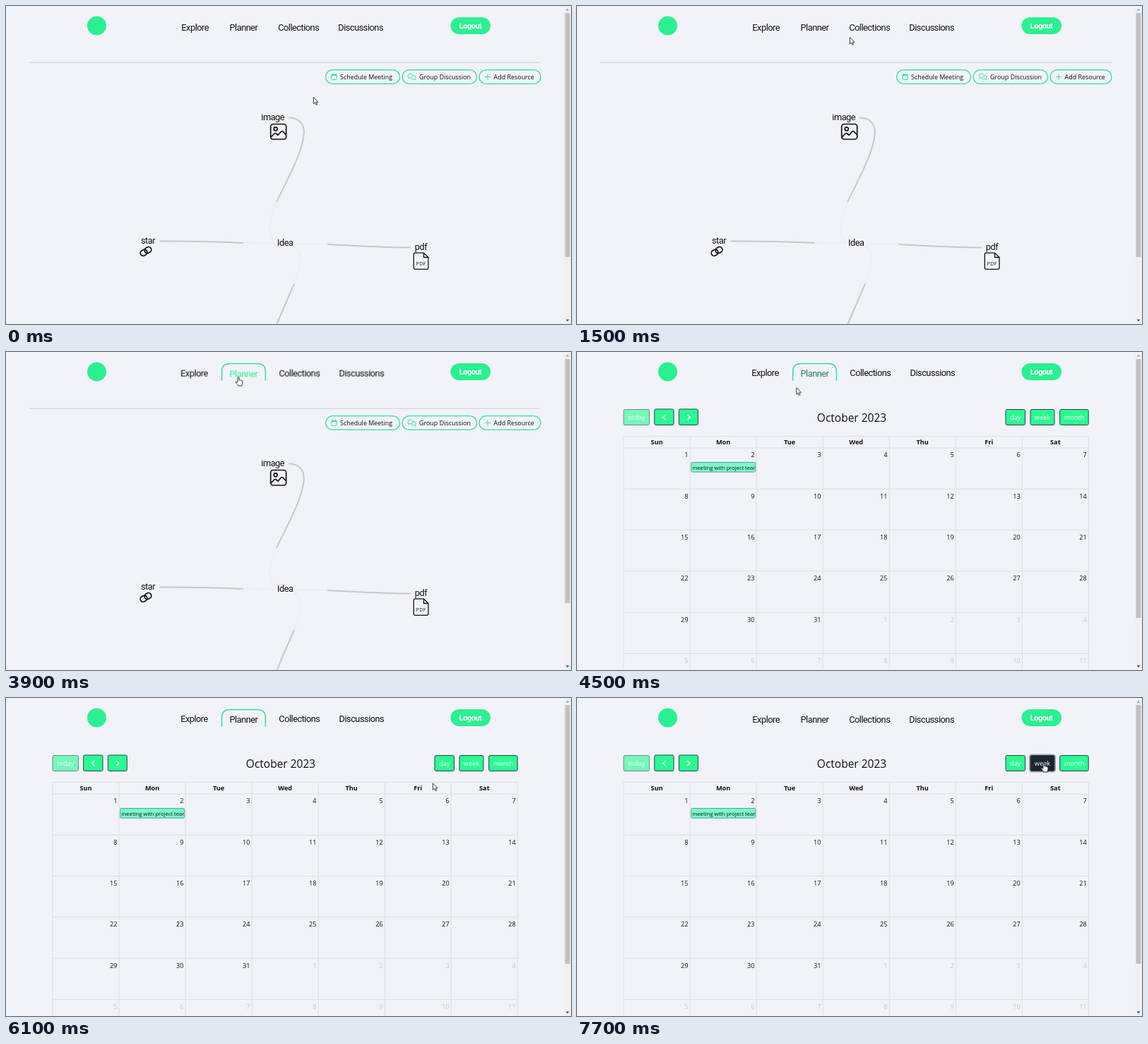
Animation of 800x451 px, one loop 8 s. Source, as an HTML page:

```html
<!DOCTYPE html>
<html lang="en">
<head>
<meta charset="utf-8">
<title>Planner</title>
<style>
html, body { margin: 0; width: 100%; height: 100%; overflow: hidden; background: #f2f3f9; }
svg { display: block; width: 100vw; height: 100vh; }
text { font-family: "Open Sans", "Noto Sans", sans-serif; fill: #111; }
.narrow { font: 12.8px Roboto, sans-serif; letter-spacing: -.5px; text-anchor: middle; }
.logout { font-size: 11px; font-weight: 700; fill: #fff; }
.pill text { font-size: 8.95px; font-weight: 500; }
.pill rect, .icon { fill: none; stroke: #2be592; stroke-width: 1.3; }
.icon { stroke-width: 1; stroke-linejoin: round; }
.ink { fill: none; stroke: #111; stroke-width: 1.7; stroke-linejoin: round; stroke-linecap: round; }
.link { fill: none; stroke: #c8c8ca; stroke-width: 2; }
.faint { stroke: #edeef2; }
.grid { fill: none; stroke: #dddee3; stroke-width: 1; }
.head { font-size: 9.2px; font-weight: 700; text-anchor: middle; }
.date { font-size: 9.2px; text-anchor: end; }
.other { fill: #c3c5ca; }
.btn rect { fill: #2bfa93; stroke: #2c3e50; stroke-width: 1; }
.btn text { font-size: 9.2px; text-anchor: middle; fill: #fff; }
.btn path { fill: none; stroke: #fff; stroke-width: 1.5; }
.off { opacity: .62; }
.pointer { fill: #fff; stroke: #222; stroke-width: .9; stroke-linejoin: round; }

/* One 8 s loop; motion advances every 100 ms */
.board, .calendar, .tab, .arrow, .hand, .week rect, .ring, .nav { animation: 8s step-end infinite; }
.board { animation-name: leave; }
.calendar { animation-name: enter; }
.tab { animation-name: focus; }
.nav { animation-name: nudge; }
.planner { animation: nudge 8s step-end infinite, hover 8s linear infinite; }
.hand { animation-name: point; }
.arrow { animation-name: unpoint; }
.week rect { animation-name: darken; }
.week .ring { fill: none; stroke: #a4a9b3; stroke-width: 2; animation-name: press; }
.cursor { animation: move 8s linear infinite; }

@keyframes leave { 0% { visibility: visible } 52.5%, 100% { visibility: hidden } }
@keyframes enter { 0% { visibility: hidden } 52.5%, 100% { visibility: visible } }
@keyframes focus { 0% { opacity: 0 } 33.75% { opacity: 1 } 95%, 100% { opacity: 0 } }
@keyframes nudge {
  0% { transform: none }
  33.75% { transform: translate(var(--dx), var(--dy, -.4px)) }
  95%, 100% { transform: none }
}
@keyframes hover {
  0%, 26.25% { fill: #111 }
  28.75%, 55% { fill: #2bf391 }
  57.5%, 100% { fill: #111 }
}
@keyframes point { 0% { opacity: 0 } 26.25% { opacity: 1 } 56.25% { opacity: 0 } 83.75%, 100% { opacity: 1 } }
@keyframes unpoint { 0% { opacity: 1 } 26.25% { opacity: 0 } 56.25% { opacity: 1 } 83.75%, 100% { opacity: 0 } }
@keyframes darken { 0% { fill: #2bfa93 } 83.75%, 100% { fill: #1e252f } }
@keyframes press { 0% { opacity: 0 } 95%, 100% { opacity: 1 } }
@keyframes move {
  0% { transform: translate(435px, 129px) }
  3.75% { transform: translate(435px, 129px); animation-timing-function: steps(12) }
  18.75% { transform: translate(386px, 44px); animation-timing-function: steps(8) }
  28.75%, 55% { transform: translate(329px, 35px); animation-timing-function: steps(8) }
  65% { transform: translate(180px, 157px); animation-timing-function: steps(4) }
  70% { transform: translate(200px, 160px) }
  71.25% { transform: translate(200px, 160px); animation-timing-function: steps(4) }
  76.25% { transform: translate(604px, 120.5px); animation-timing-function: steps(6) }
  83.75% { transform: translate(645px, 101px); animation-timing-function: steps(7) }
  92.5%, 100% { transform: translate(661px, 92px) }
}
</style>
</head>
<body>
<svg viewBox="0 0 800 451">
  <rect width="800" height="451" fill="#f2f3f9"/>
  <rect x="790" width="10" height="451" fill="#f1f1f3"/>
  <path d="M792.5 6.5h5l-2.5-3z" fill="#a3a3a3"/>
  <path d="M792.5 444.5h5l-2.5 3z" fill="#505050"/>

  <circle cx="128.5" cy="28" r="13.5" fill="#2bf091"/>
  <g class="narrow">
    <text class="narrow nav" x="267.7" y="34.7" style="--dx:-1.2px">Explore</text>
    <text class="narrow nav planner" x="336.5" y="34.7" style="--dx:0px;--dy:.5px">Planner</text>
    <text class="narrow nav" x="414.2" y="34.7" style="--dx:1.2px">Collections</text>
    <text class="narrow nav" x="502.2" y="34.7" style="--dx:1.2px">Discussions</text>
  </g>
  <path class="tab" d="M305.6 40.5V28Q305.6 16.5 317 16.5H356Q367.4 16.5 367.4 28V40.5" fill="none" stroke="#2be592" stroke-width="1.5"/>
  <rect x="629.5" y="16" width="56.5" height="24" rx="12" fill="#2bf091"/>
  <text class="narrow logout" x="657.5" y="32.2">Logout</text>

  <g class="board">
    <rect x="791.5" y="10" width="7" height="346" fill="#c1c1c3"/>
    <path d="M33 80.2H757" stroke="#d3d4d9" stroke-width="1.2"/>
    <g class="pill">
      <rect x="452.6" y="90.6" width="105" height="19.8" rx="9.9"/>
      <text x="473" y="104">Schedule Meeting</text>
      <rect x="561" y="90.6" width="105.5" height="19.8" rx="9.9"/>
      <text x="585" y="104">Group Discussion</text>
      <rect x="670" y="90.6" width="87" height="19.8" rx="9.9"/>
      <text x="690.5" y="104">Add Resource</text>
    </g>
    <path class="icon" d="M460.8 97.5h7.4v6a1 1 0 0 1-1 1h-5.4a1 1 0 0 1-1-1zM460.8 98.6h7.4M462.6 96v2M466.4 96v2"/>
    <path class="icon" d="M569 102.2c1-.6.9-1 .7-1.600a3.600 2.900 0 1 1 2.500 1.200c-1 .6-2 .7-3.200.4zM577 98.500a3 2.600 0 0 1 2.600 4.300c0 .7.300 1.100.8 1.600-1.300.2-2-.1-2.900-.6a3.200 2.600 0 0 1-3.900-1"/>
    <path class="icon" d="M682 96.500v8M678 100.500h8"/>

    <path class="link faint" d="M383 278C375 296 371 314 375 325C377 331 381 334 384 335M336 336L383 336.500M408 337Q432 337 455 338M407 340Q417 346 417 360Q416 376 408 394"/>
    <path class="link" d="M400 158.500C417 158 423.500 170 421.500 184C418 212 398 246 383 278M217.500 333.500Q285 333.500 336 336M455 338C500 340.500 540 342.500 573 342.500M408 394Q396 422 383 452"/>
    <text class="narrow" x="377.700" y="162">image</text>
    <text class="narrow" x="201" y="337">star</text>
    <text class="narrow" x="395.200" y="340.300">Idea</text>
    <text class="narrow" x="587.500" y="346">pdf</text>

    <g class="ink">
      <rect x="374.700" y="167.500" width="22" height="21.500" rx="3.500"/>
      <circle cx="381.700" cy="174.300" r="2.500"/>
      <path d="M375.500 185.500l4.500-4.500q1.300-1 2.600 0l2.400 2.200 4.500-5q1.300-1.200 2.600 0l4.200 4.300"/>
    </g>
    <g class="ink" transform="rotate(-32 198 348)">
      <rect x="189.500" y="344" width="10" height="8" rx="4"/>
      <rect x="196.500" y="344" width="10" height="8" rx="4"/>
    </g>
    <path class="ink" style="stroke-width:1.300" d="M579 350.200H591.500L598 356.500V371.500Q598 373.300 596.300 373.300H579Q577.300 373.300 577.300 371.500V352Q577.300 350.200 579 350.200ZM591.500 350.200V356.500H598"/>
    <text x="587.700" y="367.500" font-size="6.800" letter-spacing=".5" text-anchor="middle">PDF</text>
  </g>

  <g class="calendar">
    <rect x="791.500" y="10" width="7" height="367" fill="#c1c1c3"/>
    <g class="btn off"><rect x="66" y="81.500" width="36.500" height="22" rx="2"/><text x="84.200" y="96">today</text></g>
    <g class="btn"><rect x="109.700" y="81" width="27.300" height="22.500" rx="2"/><path d="M125.300 89l-3.600 3.600 3.600 3.600"/></g>
    <g class="btn"><rect x="144.300" y="81" width="27" height="22.500" rx="2"/><path d="M156.300 89l3.600 3.600-3.600 3.600"/></g>
    <text x="389" y="98.500" font-size="15.500" text-anchor="middle">October 2023</text>
    <g class="btn"><rect x="607" y="81.500" width="27.500" height="22" rx="2"/><text x="620.800" y="96">day</text></g>
    <g class="btn week"><rect class="ring" x="641" y="80.500" width="36" height="24" rx="3"/><rect x="642" y="81.500" width="34" height="22" rx="2"/><text x="659" y="96">week</text></g>
    <g class="btn"><rect x="683.700" y="81.500" width="40.500" height="22" rx="2"/><text x="704" y="96">month</text></g>
    <g id="month"></g>
    <clipPath id="slot"><rect x="162" y="156" width="90" height="15"/></clipPath>
    <rect x="161.700" y="156.500" width="91" height="13.700" rx="1.500" fill="#7df8cb" stroke="#4aa3a8"/>
    <text x="163.300" y="166.500" font-size="7.600" clip-path="url(#slot)">meeting with project team</text>
  </g>

  <g class="cursor">
    <path class="pointer arrow" d="M.4.400V9.800L2.600 7.800 4.100 11.200 5.700 10.500 4.200 7.200H7Z"/>
    <path class="pointer hand" d="M-1 1.200Q0-.2 1 1.200V5Q2 4 2.900 5.200 3.900 4.500 4.600 5.800 5.700 5.300 6 6.700V9Q6 10.500 5.200 11.500V13H-.5V12Q-2 10.500-3.500 8.200-3.800 6.800-2.400 7L-1 8.300Z"/>
  </g>
</svg>
<script>
const left = 66, top0 = 136, colW = 94.05, rowH = 58.3;
const month = document.getElementById("month");

function add(tag, attrs, label = "") {
  const el = document.createElementNS("http://www.w3.org/2000/svg", tag);
  for (const key in attrs) el.setAttribute(key, attrs[key]);
  el.textContent = label;
  month.append(el);
}

const right = left + 7 * colW;
let lines = `M${left} 119.500H${right}`;
for (let c = 0; c <= 7; c++) lines += `M${left + c * colW} 119V451`;
for (let r = 0; r < 6; r++) lines += `M${left} ${top0 + r * rowH}H${right}`;
add("path", { class: "grid", d: lines });

["Sun", "Mon", "Tue", "Wed", "Thu", "Fri", "Sat"].forEach((day, c) =>
  add("text", { class: "head", x: left + (c + .5) * colW, y: 131 }, day));

for (let i = 0; i < 42; i++) {
  add("text", {
    class: i < 31 ? "date" : "date other",
    x: left + (i % 7 + 1) * colW - 2.6,
    y: top0 + Math.floor(i / 7) * rowH + 13.3
  }, i % 31 + 1);
}
</script>
</body>
</html>
```
